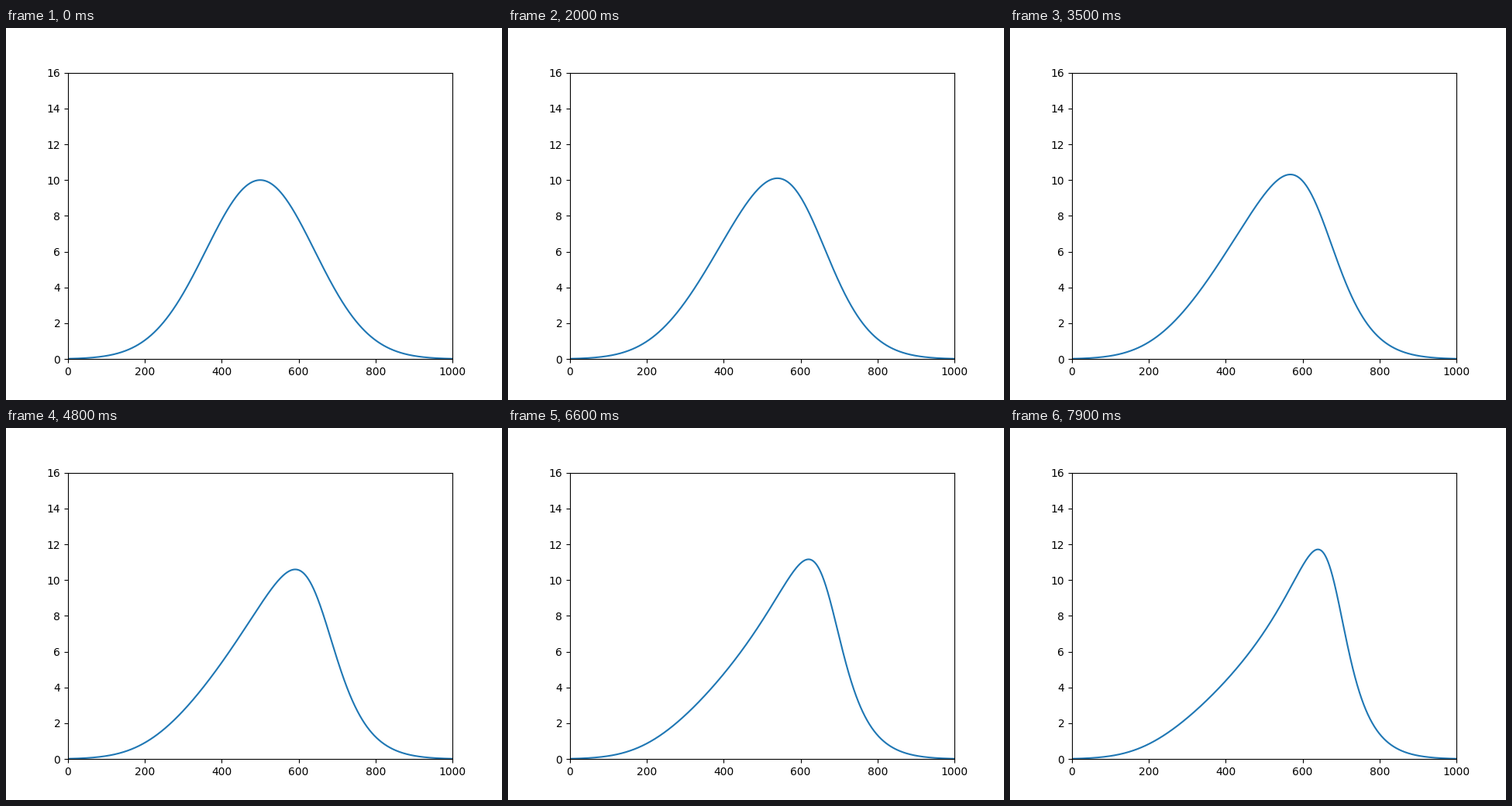
Recreate the animation shown at these times as a matplotlib script. Size 640 px wide and 480 px high, loop 8000 ms.

```python
import numpy as np
import matplotlib.pyplot as plt
from matplotlib.animation import FuncAnimation

FRAMES = 80
INTERVAL = 100
CENTER, WIDTH, HEIGHT = 500, 200, 10
SPEED = 0.1  # drift per frame for each unit of density

# Each parcel keeps its starting velocity, proportional to its density.
start = np.linspace(-10, 1010, 1021)
density = HEIGHT * np.exp(-((start - CENTER) / WIDTH) ** 2)
slope = -2 * (start - CENTER) / WIDTH**2 * density


def profile(step):
    """Positions and densities of the parcels after some steps."""
    shift = SPEED * step
    return start + shift * density, density / (1 + shift * slope)


fig, ax = plt.subplots(figsize=(6.4, 4.8), dpi=100)
ax.set_xlim(0, 1000)
ax.set_ylim(0, 16)
line, = ax.plot(*profile(0))


def update(step):
    line.set_data(*profile(step))
    return line,


anim = FuncAnimation(fig, update, frames=FRAMES, interval=INTERVAL,
                     repeat=True, repeat_delay=0, blit=False)
plt.show()
```
